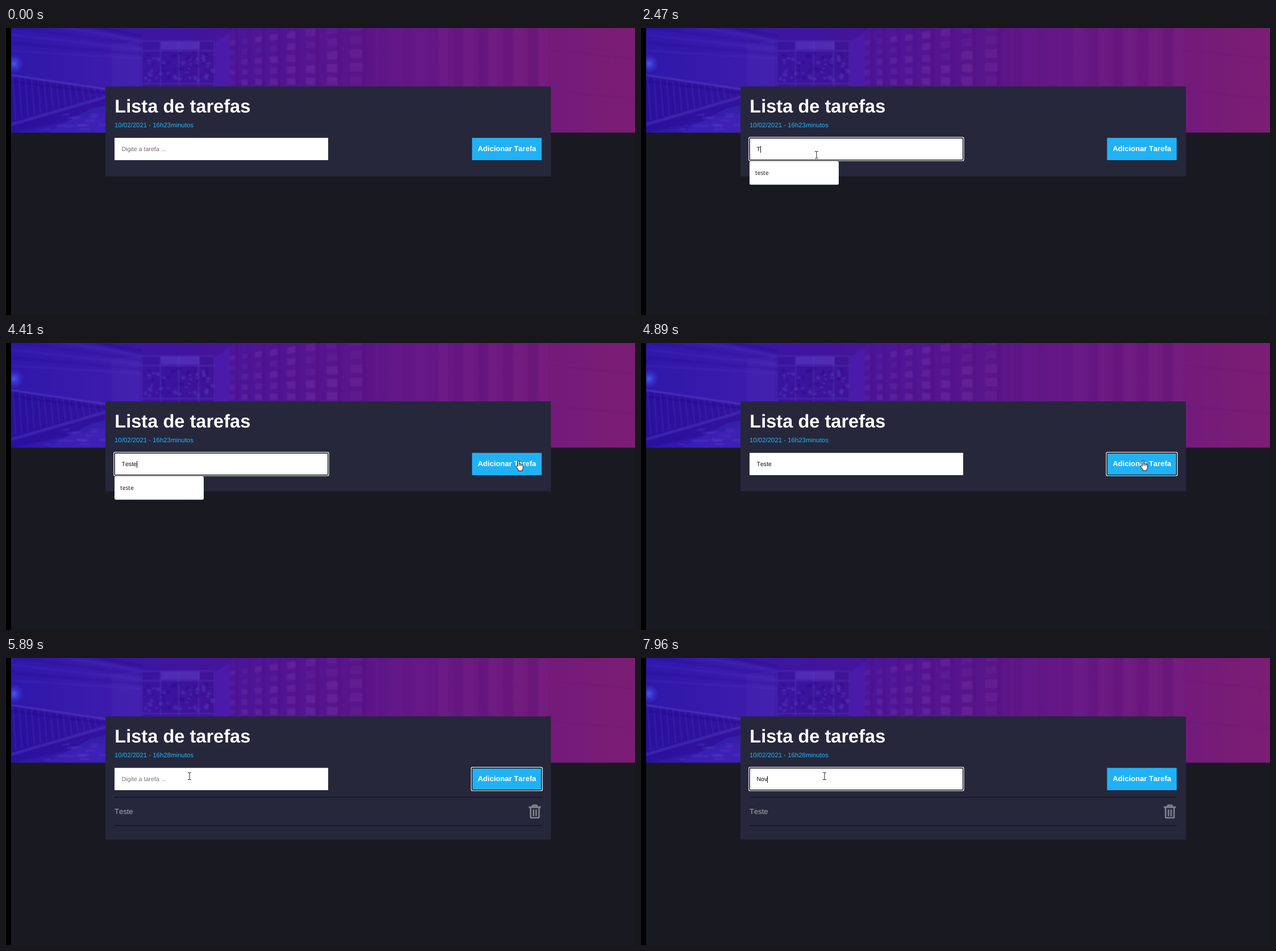
An HTML page for the animation above (8000 ms loop, 1107 px wide and 506 px high).

```html
<!DOCTYPE html>
<html lang="pt">
<head>
<meta charset="utf-8">
<title>Lista de tarefas</title>
<style>
  html, body { margin: 0; width: 100%; height: 100%; overflow: hidden; background: #191922; }
  svg { display: block; }
  text { font-family: "Liberation Sans", Arial, sans-serif; font-kerning: none; text-rendering: geometricPrecision; white-space: pre; }
  .bold { font-weight: bold; fill: #fff; }
  .ring { fill: none; }
</style>
</head>
<body>
<svg width="1107" height="506" viewBox="0 0 1107 506">
  <defs>
    <linearGradient id="tint">
      <stop offset="0" stop-color="#2e18aa"/>
      <stop offset=".2" stop-color="#401cab"/>
      <stop offset=".38" stop-color="#50189c"/>
      <stop offset=".6" stop-color="#621889"/>
      <stop offset=".84" stop-color="#711a7c"/>
      <stop offset="1" stop-color="#7c1d73"/>
    </linearGradient>
    <radialGradient id="lamp">
      <stop offset="0" stop-color="#4a58f0"/>
      <stop offset="1" stop-color="#3a30d0" stop-opacity="0"/>
    </radialGradient>
    <clipPath id="banner"><path d="M9 0H1107V184.5H9z"/></clipPath>
    <filter id="soft"><feGaussianBlur stdDeviation="1"/></filter>
  </defs>

  <rect width="9" height="506"/>
  <g clip-path="url(#banner)">
    <rect x="9" width="1098" height="185" fill="url(#tint)"/>
    <g id="photo" filter="url(#soft)"></g>
  </g>

  <rect id="card" x="175" y="103" width="784" fill="#26273b"/>
  <text class="bold" x="191.3" y="149" font-size="32.6">Lista de tarefas</text>
  <text id="date" x="191" y="175" font-size="11.42" fill="#20b6fb"></text>

  <g id="item">
    <path d="M191 245.5H943M191 295.5H943" stroke="#0e0e16"/>
    <text x="191" y="274.5" font-size="13.04" fill="#a9aab5">Teste</text>
    <g fill="none" stroke="#80818d" stroke-width="2.9">
      <path d="M920 263H941.3M925.6 262.6L927.7 259.7H933.6L935.7 262.6"/>
      <path d="M923.2 264V280.2Q923.2 281.8 924.8 281.8H936.5Q938.1 281.8 938.1 280.2V264M928.3 267V279M933 267V279" stroke-width="2.6"/>
    </g>
  </g>

  <rect x="191" y="193.7" width="376" height="39.3" fill="#fff"/>
  <rect x="820.2" y="193.7" width="122.5" height="39.3" fill="#20b2f5"/>
  <g id="inputRing" class="ring">
    <rect x="189.9" y="192.7" width="378" height="41.2" rx="2" stroke="#fff" stroke-width="1.4"/>
    <rect x="191.2" y="194" width="375.4" height="38.6" rx="1" stroke="#101010" stroke-width="1.3"/>
  </g>
  <g id="buttonRing" class="ring">
    <rect x="819" y="192.7" width="124.8" height="41.2" rx="2" stroke="#fff" stroke-width="1.4"/>
    <rect x="820.3" y="194" width="122.2" height="38.6" rx="1" stroke="#101010" stroke-width="1.3"/>
  </g>
  <text class="bold" x="830.2" y="217.3" font-size="13.04">Adicionar Tarefa</text>
  <text id="hint" x="203.4" y="217.2" font-size="10.67">Digite a tarefa ...</text>
  <text id="typed" x="203.4" y="217.2" font-size="10.67" fill="#111"></text>
  <rect id="caret" y="208" width="1" height="12" fill="#111"/>

  <g id="menu">
    <rect x="191" y="235" width="157" height="41.3" rx="2.5" fill="#fff"/>
    <text x="201" y="259" font-size="10.3" fill="#111" style="font-family:'Open Sans','Noto Sans',sans-serif">teste</text>
  </g>

  <circle id="press" r="9.5" fill="#fdf36a"/>
  <g id="arrow" fill="#fff" stroke="#000" stroke-width=".8">
    <path d="M.4.8V13.2L3.3 10.5L5.2 14.8L7.2 14L5.3 9.7H9.4z"/>
  </g>
  <g id="beam" fill="none" stroke="#222">
    <path d="M-3-6H-1Q0-6 0-5Q0-6 1-6H3M0-5V5.5M-3 6.5H-1Q0 6.5 0 5.5Q0 6.5 1 6.5H3"/>
  </g>
  <g id="hand" fill="#fff" stroke="#000" stroke-width=".9">
    <path d="M-1.3 0Q0-1.4 1.3 0V5.2Q2.7 4.3 3.6 5.6Q5 4.8 5.9 6.2Q7.7 5.8 8 7.6V11.5Q8 13.8 6.5 15.5V17.5H-.2V15.7L-4 10.6Q-4.6 8.7-3 8.6Q-2 8.8-1.3 9.8z"/>
    <path d="M1.3 5V8.5M3.7 6V8.8M5.9 6.6V9" fill="none"/>
  </g>
</svg>
<script>
const $ = id => document.getElementById(id);

// Banner picture: walkway, glass door and a receding stone wall.
let seed = 7;
const random = () => (seed = seed * 16807 % 2147483647) / 2147483647;
const shapes = [];
const shape = (d, fill, opacity) => shapes.push(`<path d="${d}" fill="${fill}" opacity="${opacity}"/>`);
const line = (d, color, width, opacity) =>
  shapes.push(`<path d="${d}" fill="none" stroke="${color}" stroke-width="${width}" opacity="${opacity}"/>`);
const dark = '#1f0a80', light = '#7558e0', plum = '#420c70', pink = '#a35ac4';

function drawBanner() {
  for (let i = 0; i < 6; i++)
    line(`M9 ${i * 14 - 30}L240 ${i * 8 + 14}`, i % 2 ? light : dark, 5, i % 2 ? .08 : .18);
  shape('M150 0H400L372 22H236z', dark, .2);
  shapes.push('<circle cx="14" cy="63" r="18" fill="url(#lamp)"/>');

  // Railing and floor.
  shape('M9 84L175 108V150L9 185z', dark, .3);
  shape('M70 185L150 142L185 134V185z', '#4a34d0', .25);
  for (let i = 0; i < 16; i++) {
    const x = 12 + i * 11;
    line(`M${x} ${86 + i * 1.5}L${x + 5} ${162 - i * 3}`, light, 2, .16);
  }
  line('M9 83L185 109', light, 2.5, .4);
  line('M9 94L185 116', dark, 3, .35);
  line('M9 170L185 119', light, 4, .26);
  for (let i = 0; i < 14; i++) {
    const x = 70 + random() * 100, y = 146 + random() * 34;
    shape(`M${x} ${y}h${6 + random() * 16}l-4 3h-14z`, light, .2);
  }

  // Glass door.
  shape('M186 28L236 22V103H186z', light, .07);
  shape('M237 22H369V103H237z', dark, .25);
  for (const x of [239, 272, 304, 339, 367]) line(`M${x} 24V103`, light, 1.6, .25);
  line('M238 23H368M240 40H368M240 98H368', light, 1.4, .25);
  shape('M273 24H340V38H273z', light, .35);
  for (let i = 0; i < 60; i++) {
    const x = 242 + random() * 118, y = 42 + random() * 48;
    shape(`M${x} ${y}h${2 + random() * 7}v${2 + random() * 5}h-5z`, random() < .6 ? light : dark, .25);
  }
  shape('M370 24L394 10V103H370z', '#4a2ad0', .25);

  // Stone blocks grow with their distance from the vanishing point.
  shape('M392 0H650V103H392z', plum, .1);
  for (let x = 394; x < 650;) {
    const w = 9 + (x - 394) * .06;
    for (let row = -3; row < 3; row++) {
      const h = 9 + (x - 394) * .03, y = 74 + row * (17 + (x - 394) * .03) - (x - 394) * .06;
      shape(`M${x} ${y}l${w} ${row * .8}v${h}l${-w} ${-row * .5}z`, pink, .05 + random() * .13);
    }
    line(`M${x + w + 3} 0V103`, plum, 4 + w * .2, .14);
    x += w * 2 + 3;
  }
  for (let x = 655; x < 950; x += 44) {
    shape(`M${x} 0h17v103h-17z`, plum, .05 + random() * .1);
    shape(`M${x + 19} 0h17v103h-17z`, pink, random() * .06);
  }
  line('M960 40L1107 54M960 112L1107 124', plum, 2, .08);
  $('photo').innerHTML = shapes.join('');
}

// Pointer stops: start time, shape, x, y.
const stops = [
  [150, 'arrow', 848, 434], [215, 'arrow', 760, 390], [280, 'arrow', 672, 346],
  [430, 'arrow', 580, 308], [520, 'arrow', 465, 262], [610, 'arrow', 399, 236],
  [910, 'beam', 345, 227], [980, 'beam', 309, 223.5],
  [3700, 'beam', 388.5, 214.5], [3780, 'arrow', 600, 198], [3860, 'arrow', 797, 185],
  [4030, 'hand', 832, 197], [4110, 'hand', 880, 205], [4180, 'hand', 925, 207.5],
  [4410, 'hand', 902, 208], [4470, 'hand', 883.5, 207.5],
  [5260, 'arrow', 808, 222], [5340, 'arrow', 715, 229], [5410, 'arrow', 598, 229],
  [5490, 'beam', 454.5, 211.5], [5730, 'beam', 400.5, 210.5], [5810, 'beam', 345.5, 208.5],
  [5890, 'beam', 323, 208]
];
const typing = [
  [0, ''], [2470, 'T'], [2840, 'Te'], [3100, 'Tes'], [3260, 'Test'], [3310, 'Teste'],
  [4940, ''], [7270, 'N'], [7490, 'No'], [7960, 'Nov']
];

const latest = (list, t) => list.filter(step => step[0] <= t).pop();
const within = (t, ...spans) => spans.some(([from, to]) => t >= from && t < to);
const show = (id, on) => $(id).style.visibility = on ? 'visible' : 'hidden';

function draw(t) {
  const added = t >= 4940;
  $('card').setAttribute('height', added ? 217.3 : 158.6);
  $('date').textContent = `10/02/2021 - 16h${added ? 28 : 23}minutos`;
  show('item', added);

  const text = latest(typing, t)[1];
  $('typed').textContent = text;
  $('hint').setAttribute('fill', added ? '#757575' : '#7a617c');
  show('hint', !text);
  $('caret').setAttribute('x', Math.round(203.4 + (text ? $('typed').getComputedTextLength() : 0)));
  show('caret', within(t, [1200, 1770], [2290, 3860], [4410, 4720], [6140, 6740], [7190, 8000]));

  show('inputRing', within(t, [1200, 4720], [6140, 8000]));
  show('buttonRing', within(t, [4720, 6140]));
  show('menu', within(t, [1290, 4720], [6240, 7270]));

  const stop = latest(stops, t);
  for (const id of ['arrow', 'beam', 'hand']) show(id, stop && stop[1] === id);
  if (stop) {
    const [, id, x, y] = stop;
    $(id).setAttribute('transform', `translate(${x} ${y})`);
    $('press').setAttribute('cx', x - 2);
    $('press').setAttribute('cy', y - .5);
  }
  show('press', within(t, [1200, 1360], [4720, 4890], [6140, 6340]));
}

function tick() {
  draw(performance.now() % 8000);
  requestAnimationFrame(tick);
}
drawBanner();
tick();
</script>
</body>
</html>
```
